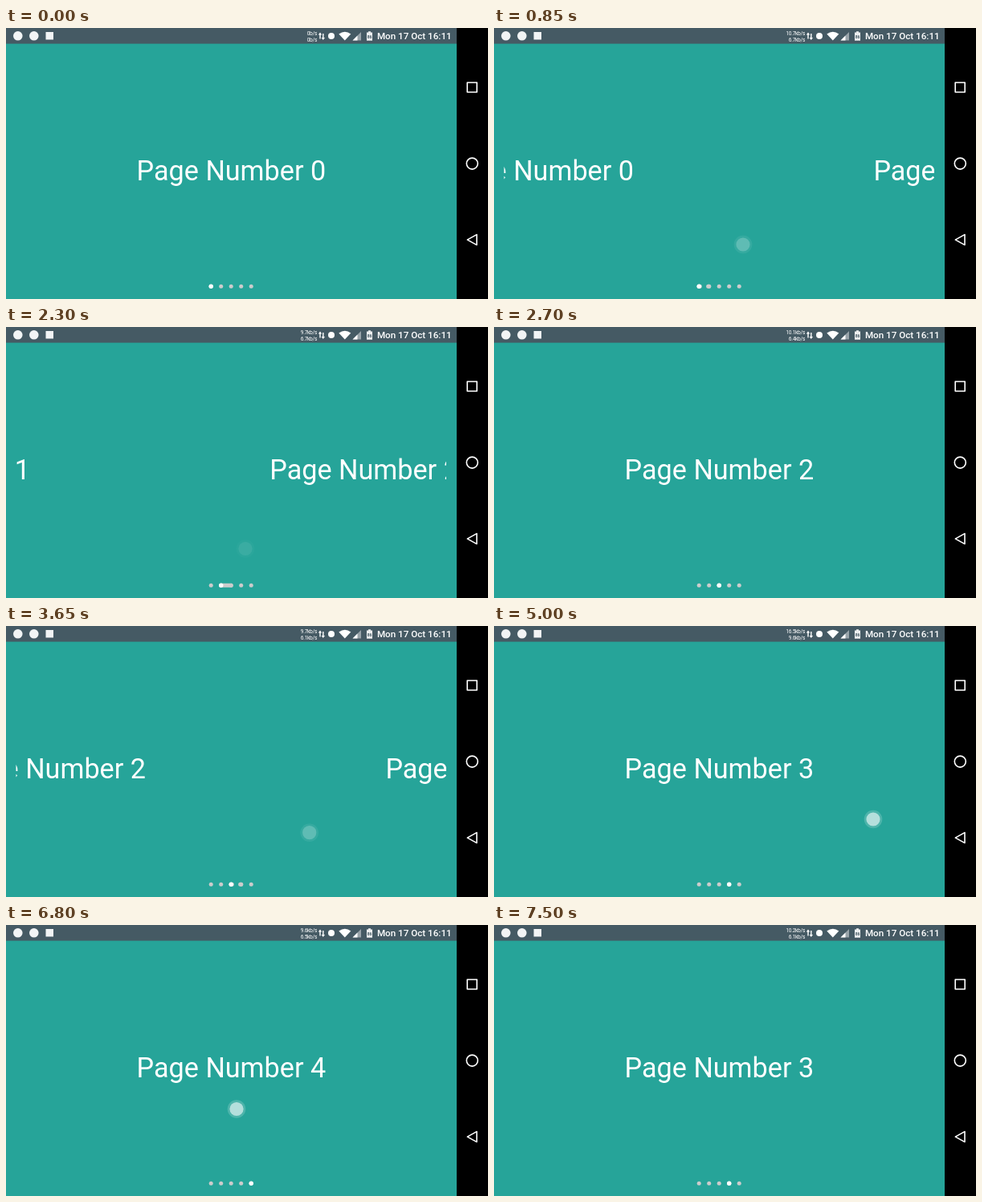
An HTML page that plays this animation: 600 px wide and 338 px high, repeating every 8 s.

```html
<!DOCTYPE html>
<html lang="en">
<head>
<meta charset="utf-8">
<title>Pager with ink dots</title>
<style>
  html, body { margin: 0; width: 100%; height: 100%; overflow: hidden; background: #000; }
  svg { display: block; width: 600px; height: 338px; }
  text { font-family: Roboto, sans-serif; fill: #fff; }
  .page { font-size: 34.2px; text-anchor: middle; }
  .speed { font-size: 6.6px; letter-spacing: -.3px; text-anchor: end; }
  .clock { font-size: 11.65px; font-weight: 500; }
  .nav { fill: none; stroke: #fff; stroke-width: 1.6; stroke-linejoin: round; }
</style>
</head>
<body>
<svg viewBox="0 0 600 338">
  <clipPath id="frame"><rect x="12.5" y="20" width="535.5" height="318"/></clipPath>
  <rect width="561" height="338" fill="#26a499"/>
  <rect width="561" height="19.6" fill="#455a64"/>

  <g fill="#f2f4f5">
    <circle cx="14.8" cy="9.8" r="5.8"/>
    <circle cx="34.8" cy="9.8" r="5.8"/>
    <rect x="49.5" y="5" width="9.5" height="9.5"/>
  </g>
  <text class="speed" id="down" x="387" y="8.9"/>
  <text class="speed" id="up" x="387" y="16.7"/>
  <g fill="#fff">
    <path d="M391 5.5l2.2 3h-1.5v5h-1.4v-5h-1.5z"/>
    <path d="M394.8 15l-2.2-3h1.5V7h1.4v5h1.5z"/>
    <circle cx="405" cy="10" r="4"/>
    <path d="M414.3 7.6Q421.8 1.9 429.3 7.6L421.8 15.6z"/>
    <path d="M431.5 15.4L442 4.9v10.5z" opacity=".45"/>
    <path d="M431.5 15.4L437.5 9.4v6z"/>
    <path d="M449 5.5h2v-1.2h3v1.2h2v10.3h-7z" opacity=".9"/>
  </g>
  <text x="452.5" y="12.6" text-anchor="middle" style="font-size:5px;font-weight:700;fill:#455a64">86</text>
  <text class="clock" x="461.9" y="14.2">Mon 17 Oct 16:11</text>

  <g clip-path="url(#frame)"><g id="pages"></g></g>
  <g id="dots" fill="#ccc"></g>
  <circle id="selected" cy="322.3" r="2.7" fill="#fff"/>
  <g id="touch" fill="#fff">
    <circle r="11.3" opacity=".18"/>
    <circle r="8.6" opacity=".58"/>
  </g>

  <rect x="561" width="39" height="338"/>
  <g class="nav">
    <rect x="574.2" y="68" width="12" height="12"/>
    <circle cx="580.3" cy="169.1" r="7"/>
    <path d="M574.3 264.1L586 257.6V270.6z"/>
  </g>
</svg>
<script>
const LOOP = 8000, STEP = 50;
const PAGE_GAP = 534, DRAGGED = 0.31, SETTLE = 440;
const DOT_X = 255.2, DOT_Y = 322.3, DOT_GAP = 12.5, R = 2.5;

// Milliseconds after the finger lifts
const MOVE = [80, 320], RETREAT = [190, 350], REVEAL = [350, 460];

const swipes = [
  { at: 600,  lift: 235, from: 0, to: 1, start: [470, 250], end: [310, 270] },
  { at: 2050, lift: 185, from: 1, to: 2, start: [463, 258], end: [298, 276.5] },
  { at: 3450, lift: 185, from: 2, to: 3, start: [530, 247], end: [377.7, 257.7] },
  { at: 5000, lift: 135, from: 3, to: 4, start: [472, 241], end: [312, 262] },
  { at: 6800, lift: 235, from: 4, to: 3, start: [287, 229.5], end: [447, 222] },
];

// Network speeds, renewed once a second from 450 ms
const speeds = [
  ['0b/s', '0b/s'], ['10.7kb/s', '6.7kb/s'], ['9.7kb/s', '6.7kb/s'], ['10.1kb/s', '6.4kb/s'],
  ['9.7kb/s', '6.1kb/s'], ['16.5kb/s', '9.6kb/s'], ['10.4kb/s', '6.6kb/s'],
  ['9.6kb/s', '6.5kb/s'], ['10.2kb/s', '6.1kb/s'],
];

const $ = id => document.getElementById(id);
const clamp = v => Math.min(1, Math.max(0, v));
const mix = (a, b, k) => a + (b - a) * k;
const part = (t, [a, b]) => clamp((t - a) / (b - a));
const dotX = i => DOT_X + i * DOT_GAP;

function make(tag, parent, attrs = {}) {
  const el = document.createElementNS('http://www.w3.org/2000/svg', tag);
  for (const key in attrs) el.setAttribute(key, attrs[key]);
  return parent.appendChild(el);
}

// cubic-bezier(.4, 0, .2, 1)
function ease(x) {
  let lo = 0, hi = 1, s = 0.5;
  for (let i = 0; i < 20; i++) {
    s = (lo + hi) / 2;
    const bx = 1.2 * s * (1 - s) ** 2 + 0.6 * s * s * (1 - s) + s ** 3;
    if (bx < x) lo = s; else hi = s;
  }
  return 3 * s * s * (1 - s) + s ** 3;
}

const dots = [], pages = $('pages');
for (let i = 0; i < 5; i++) {
  make('text', pages, { class: 'page', x: 280.4 + i * PAGE_GAP, y: 190.4 }).textContent = 'Page Number ' + i;
  dots.push(make('circle', $('dots'), { cx: dotX(i), cy: DOT_Y, r: R }));
}
const ink = make('path', $('dots'));

function pillPath(a, b) {
  return `M${a} ${DOT_Y - R}H${b}a${R} ${R} 0 0 1 0 ${2 * R}H${a}a${R} ${R} 0 0 1 0 ${-2 * R}z`;
}

// Two neighbouring dots stretch toward each other, then fuse by a growing neck
function joinPath(a, b, k) {
  const reach = 0.35 * Math.min(k, 0.5) * (DOT_GAP - 2 * R);
  const neck = R * clamp((k - 0.4) * 4);
  const bridge = k < 0.5 ? '' : `M${a} ${DOT_Y - neck}H${b}v${2 * neck}H${a}z`;
  return pillPath(a, a + reach) + pillPath(b - reach, b) + bridge;
}

function drawInk(s, k, since) {
  const xs = [dotX(s.from), dotX(s.to)];
  let d = '', r = R;
  if (since >= RETREAT[0]) {
    const tail = mix(xs[0], xs[1], ease(part(since, RETREAT)));
    d = pillPath(Math.min(tail, xs[1]), Math.max(tail, xs[1]));
    r = R * part(since, REVEAL);
  } else if (k > 0) {
    d = joinPath(Math.min(...xs), Math.max(...xs), k);
  }
  ink.setAttribute('d', d);
  dots.forEach((dot, i) => dot.setAttribute('r', i === s.from ? r : R));
}

function render(t) {
  const s = swipes.filter(w => w.at <= t).pop() || { ...swipes[0], at: LOOP };
  const since = t - s.at - s.lift;
  const drag = clamp((t - s.at) / s.lift) ** 1.5;
  const k = since < 0 ? DRAGGED * drag
    : 1 - (1 - DRAGGED) * (1 - clamp(since / SETTLE)) ** 5;

  pages.setAttribute('transform', `translate(${-PAGE_GAP * mix(s.from, s.to, k)} 0)`);
  drawInk(s, k, since);
  $('selected').setAttribute('cx', dotX(mix(s.from, s.to, ease(part(since, MOVE)))));

  const [x, y] = [0, 1].map(i => mix(s.start[i], s.end[i], drag));
  const shown = t < s.at ? 0 : since < 0 ? 1 : clamp(0.48 - since * 0.0053);
  $('touch').setAttribute('transform', `translate(${x} ${y})`);
  $('touch').setAttribute('opacity', shown);

  const [down, up] = speeds[Math.floor((t + 550) / 1000)];
  $('down').textContent = down;
  $('up').textContent = up;
}

const begin = performance.now();
function tick() {
  const t = (performance.now() - begin) % LOOP;
  render(Math.floor(t / STEP) * STEP);
  requestAnimationFrame(tick);
}
tick();
</script>
</body>
</html>
```
